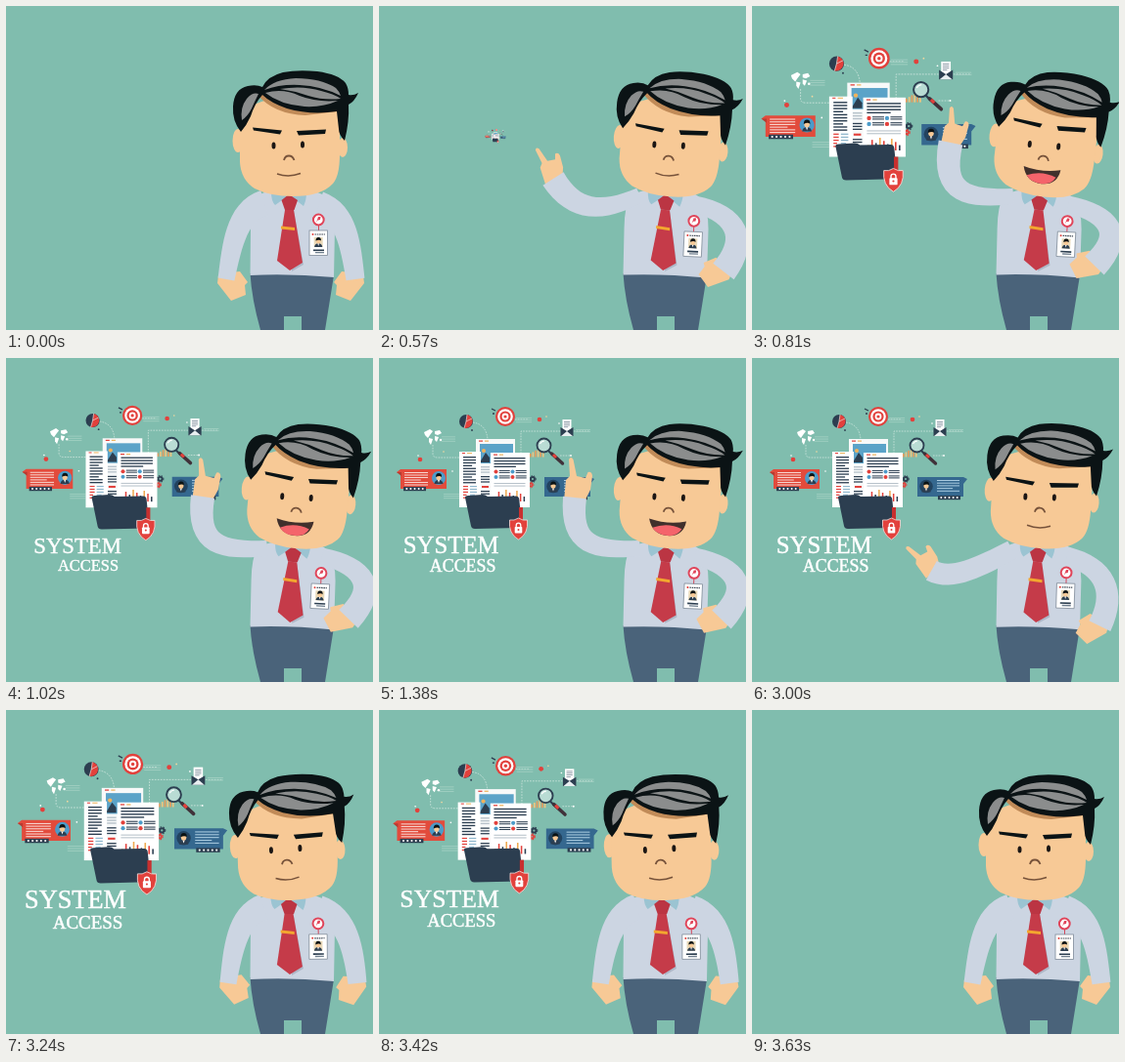
Recreate the animation shown at these times as an HTML page. Size 375x332 px, loop 4.5 s.

```html
<!DOCTYPE html>
<html lang="en">
<head>
<meta charset="utf-8">
<title>System access</title>
<style>
html, body { margin: 0; width: 100%; height: 100%; overflow: hidden; background: #80bdae; }
svg { display: block; width: 375px; height: 332px; }
text { font-family: "Liberation Serif", "Times New Roman", serif; fill: #fff; stroke: #fff; stroke-width: 0.45; }
</style>
</head>
<body>
<svg id="stage" viewBox="0 0 375 332"></svg>
<script>
const LOOP = 4500;
const NAVY = '#2c3e50', RED = '#e2413c', SKIN = '#f7c996', HAIR = '#0b1315', SHIRT = '#ccd5e2', GRAY = '#8b8d8d';

const path = (d, fill, extra = '') => `<path d="${d}" fill="${fill}" ${extra}/>`;
const line = (d, stroke, w = 1, extra = '') => path(d, 'none', `stroke="${stroke}" stroke-width="${w}" ${extra}`);
const rect = (x, y, w, h, fill, extra = '') => `<rect x="${x}" y="${y}" width="${w}" height="${h}" fill="${fill}" ${extra}/>`;
const dot = (x, y, r, fill, extra = '') => `<circle cx="${x}" cy="${y}" r="${r}" fill="${fill}" ${extra}/>`;
const oval = (x, y, rx, ry, fill) => `<ellipse cx="${x}" cy="${y}" rx="${rx}" ry="${ry}" fill="${fill}"/>`;
const group = (id, body) => `<g id="${id}">${body}</g>`;
const repeat = (n, fn) => Array.from({ length: n }, (_, i) => fn(i)).join('');
const rows = (x, y, w, n, gap, fill, h = 1) =>
  repeat(n, i => rect(x, y + i * gap, i % 4 === 3 ? w * 0.7 : w, h, fill));
const person = (x, y, s) => `<g transform="translate(${x} ${y}) scale(${s})">` +
  path('M-4.5 6Q-4 2 0 2Q4 2 4.5 6Z', NAVY) + path('M-1 2L1 2L0 5Z', '#fff') +
  oval(0, -1, 2.6, 3.3, SKIN) + path('M-3 -1Q-3 -5 0 -5Q3.4 -5 3 -1Q1 -3 -3 -1Z', HAIR) + '</g>';

function wires() {
  const dash = d => line(d, '#d9ece5', 0.7, 'stroke-dasharray="1.6 1.2"');
  return dash('M96 66Q110 68 111 84') + dash('M55 89V98Q55 102 60 102H82') +
    dash('M145 98V75H185') + dash('M199 75H216') + dash('M139 63H152') + dash('M185 100H196') +
    rows(64, 80.5, 14, 3, 2.2, '#a8d3c6', 0.7) + rows(66, 139, 16, 3, 2.2, '#a8d3c6', 0.7) +
    rows(140, 61, 16, 3, 2.2, '#a8d3c6', 0.7) + rows(201, 73, 15, 2, 2.2, '#a8d3c6', 0.7) +
    dot(42, 104, 2.3, RED) + dot(164, 63, 2.3, RED) + dot(40, 100, 0.8, '#fff') +
    dot(95, 74, 0.9, NAVY) + dot(171, 60, 0.8, '#f3d9a0') + dot(184, 67, 0.8, '#fff') +
    dot(66, 96, 0.8, '#f3d9a0') + dot(196, 100, 0.9, '#fff') + dot(75, 116, 0.8, '#fff');
}

function smallIcons() {
  const map = path('M46 76L52 73L55 75L52 79L50 82L47 79Z', '#fff') + path('M51 82L55 83L53 89L51 86Z', '#fff') +
    path('M57 75L62 74L64 77L60 79L57 78Z', '#fff') + path('M57 80L61 81L59 86L57 84Z', '#fff') + dot(63, 84, 1.2, '#fff');
  const pie = dot(89, 65, 7, NAVY) + path('M89 65L90 58A7 7 0 0 1 87 71.7Z', RED) +
    line('M90 58L89 65L87 72M89 65L95 62', '#e9d9d6', 0.7);
  const target = [10, 7.8, 5.6, 3.4, 1.6].map((r, i) => dot(129, 60, r, i % 2 ? '#fff' : RED)).join('') +
    line('M115 52L119 54M116 57L118 57', NAVY, 1.3);
  const mail = rect(187.5, 63, 9, 13, '#fff') + rows(189, 65, 6, 4, 1.8, '#7d8c9a', 0.8) +
    path('M185.5 71L192 75L198.5 71V80H185.5Z', NAVY) + path('M186 80L192 75L198 80Z', '#e8eef0');
  const bars = repeat(6, i => rect(154 + i * 2.6, 98 - i * 1.6, 1.6, 3.5 + i * 1.6, i % 2 ? '#efc67f' : '#e89b5b'));
  const lens = line('M173 95L178 100', NAVY, 2) + line('M176.5 98L187.5 108', '#40323a', 3.4, 'stroke-linecap="round"') +
    line('M178 99L181 102', RED, 3) + dot(168.5, 89.5, 7, '#b9dcd4', `stroke="${NAVY}" stroke-width="1.8"`) +
    line('M164.5 88Q166 85 169 85', '#fff', 1.1);
  const gear = (x, y, r, c) => dot(x, y, r, 'none', `stroke="${c}" stroke-width="1.8"`) +
    dot(x, y, r + 1.3, 'none', `stroke="${c}" stroke-width="1" stroke-dasharray="1.4 1.3"`);
  return map + pie + target + mail + bars + lens + gear(157, 124, 2, NAVY) + gear(155, 130, 1.6, RED);
}

function cards() {
  const stars = (x, y) => rect(x, y, 23, 4.2, NAVY) + repeat(5, i => dot(x + 3.3 + i * 4.1, y + 2.1, 1, '#fff'));
  return path('M18 117L22 119V134H69V114H22Z', '#e24b3c') + path('M18 117H23V121Z', '#b93a30') +
    rows(26, 117, 24, 6, 2.5, '#f8d5cf', 1) + dot(61, 123, 7, '#4c9bc9') + person(61, 123, 1) + stars(25, 132) +
    path('M169 122H216L220 124L216 129V142H169Z', '#35688f') + rows(189, 125, 23, 5, 2.7, '#a9cbe0', 1) +
    dot(178, 131.5, 6.8, '#22435f') + person(178, 131.5, 1) + stars(190, 141);
}

function papers() {
  const left = rect(82, 96, 22, 57, '#fff') + rect(85, 97, 3, 1, RED) + rect(90, 97, 5, 1, '#efb45e') +
    rows(86, 101, 13, 10, 2.9, NAVY, 1.3) + rows(86, 131, 5, 5, 2.9, RED, 1.2) + rows(93, 131, 7, 5, 2.9, '#8fb6cc', 1.2);
  const back = rect(99, 83, 40, 70, '#f7f9f9') + rect(102, 84.5, 4, 1.2, RED) + rect(108, 84.5, 4, 1.2, '#efb45e') +
    rect(103, 88, 34, 20, '#5ba3c8') + path('M103 107L109 97L113 102L113 107Z', NAVY) + dot(107, 95, 2, '#f0b35b') +
    rows(104, 111, 9, 3, 2.7, '#b6c1c9', 1.3) + rows(104, 121, 9, 3, 2.7, NAVY, 1.2) +
    rect(105, 131, 7, 2, RED) + rows(104, 136, 9, 2, 2.6, NAVY, 1.2);
  const front = rect(114, 97, 40, 56, '#fff') + rect(117, 98.5, 4, 1.2, RED) + rect(123, 98.5, 4, 1.2, '#efb45e') +
    rows(117.5, 102, 32, 4, 2.9, NAVY, 1.3) +
    repeat(4, i => {
      const x = 119.5 + (i % 2) * 17, y = 116.5 + (i >> 1) * 5.5;
      return dot(x, y, 2, i % 3 ? '#4c9bc9' : RED) + rows(x + 3.2, y - 1.6, 11, 2, 2, NAVY, 1);
    }) +
    rows(117.5, 128, 32, 2, 2.6, '#b6c1c9', 1) +
    repeat(9, i => {
      const h = 5 + (i * 5 % 8);
      return rect(118 + i * 3.7, 147 - h, 1.5, h, ['#efa94f', RED, NAVY][i % 3]);
    });
  const folder = path('M88 143Q88 141 91 141L106 140Q109 140 111 142L140 141.5Q143 141.5 143.3 145L146 172Q146 174 143 174L98 175Q94.5 175 94 172Z', NAVY);
  const shield = rect(143, 153, 4, 14, '#c9302f') +
    path('M142.5 164Q147 167 151.5 166Q153 180 142.5 186Q132 180 133.5 166Q138 167 142.5 164Z', RED, 'stroke="#f7dedb" stroke-width="0.8"') +
    rect(138.7, 173, 7.6, 6.5, '#fff', 'rx="0.8"') + line('M140.2 174V171.5A2.3 2.3 0 0 1 144.8 171.5V174', '#fff', 1.3) + dot(142.5, 176, 1, RED);
  return back + left + front + folder + shield;
}

function head() {
  const face = oval(237, 138, 5.5, 12, SKIN) + oval(344, 145, 5, 10, SKIN) +
    path('M239 108L239 160Q240 178 254 187Q270 195 293 195Q322 195 334 182Q341 174 341 152L341 98Q290 80 239 108Z', SKIN);
  const hair = path('M257 91Q274 111 306 112L339 108L330 98L262 84Z', '#c18b58') +
    path('M240 129Q231 118 232 103Q233 85 247 82Q256 80 262 83Q267 72 283 68Q298 65 318 67Q340 70 347 79Q350 84 350 91Q355 92 360 89Q356 98 350 101Q351 118 346 138Q340 132 340 126L338 108Q311 112 287 105Q270 99 262 91Q254 100 250 113Q246 122 240 129Z', HAIR) +
    path('M241 117Q239 104 246 95Q252 88 258 90Q254 98 251 105Q247 113 241 117Z', GRAY) +
    path('M264 86Q274 75 296 74Q322 74 337 84Q341 88 342 92Q322 82 300 81Q280 80 264 86Z', GRAY) +
    path('M265 89Q283 84 300 92Q318 99 339 97Q324 104 305 103Q280 101 265 89Z', GRAY) +
    path('M280 85Q303 81 322 87Q335 90 342 95Q325 97 309 92Q295 87 280 85Z', GRAY);
  const brows = group('brows', path('M252 124.5L282 127.5L280 131.5L253 127.5Z', HAIR) + path('M297 128L327 126.5L326 131L299 132.5Z', HAIR));
  const open = group('open', path('M270 166Q289 171 308 166Q306 182 290 182Q274 182 270 166Z', '#41302c') +
    path('M274 175Q289 168 304 174Q300 182 290 182Q279 182 274 175Z', '#f4646b'));
  return face + hair + brows + oval(273.5, 143, 2, 3.5, '#1b1614') + oval(303, 142, 2, 3.5, '#1b1614') +
    line('M284 158Q285 153.5 289 153.5Q293 153.5 294.5 158', '#76523a', 1.8) +
    group('shut', line('M277 172Q289 176 301 171.5', '#76523a', 1.5)) + open;
}

function badge() {
  return line('M319.5 224V231', '#d3475a', 1) + dot(319.3, 219, 5.4, '#fff', 'stroke="#e0455a" stroke-width="2"') +
    path('M317 222L319 216H321.5L321 219L318.5 219.5Z', '#e0455a') +
    rect(310, 230, 18.5, 25.5, '#fff', 'stroke="#7f8b99" stroke-width="0.8"') +
    dot(313.5, 234, 1, RED) + line('M315.5 234H326', '#424b57', 1.2, 'stroke-dasharray="1.6 0.7"') +
    rect(314.7, 237, 9, 10, '#e9d9b9') + person(319.2, 241.5, 0.9) + rect(314, 249.5, 11, 1.6, NAVY) + rect(316, 252, 9, 1.3, '#71808f');
}

const torso = path('M249.5 276L250 228Q250 206 256 195Q264 190 273 189H307Q320 190 326 195Q336 207 336 228L335 278Q290 274 249.5 276Z', SHIRT);
const tie = path('M273 190L289 194L275 204Q271 200 271 191Z', '#9bc4d2') + path('M307 190L290 194L304 205Q307 199 307 191Z', '#9bc4d2') +
  path('M294 209L304 265L292 272Z', '#aeb9c9') + path('M285 209H294L303 263L290 271L277 261Z', '#c53b49') +
  path('M289 193L298 199L294.5 209H285L281.5 199Z', '#bb3543') + path('M281 225.5L295 227V230L281 228.5Z', '#f3a72f');
const hand = path('M-9 4L-8 -4L4 -7L14 -8L22 3L19 6L20 16L5 22Z', SKIN);
const point = path('M-11 3L-9 -18L-5 -22L-6 -39Q-4 -43 -1.5 -39L2 -22L11 -20L13.5 -26Q17.5 -27 18 -22L16 -8L10 4Z', SKIN);

const stage = document.getElementById('stage');
stage.innerHTML = rect(0, 0, 375, 332, '#80bdae') +
  group('cluster', wires() + smallIcons() + cards() + papers() +
    group('title', '<text x="24.8" y="199.5" font-size="24.8">SYSTEM</text><text x="51.8" y="218.5" font-size="17.9">ACCESS</text>')) +
  path('M249.5 274Q290 271 335 276L326 332H302V318H284V332H260Q251 300 249.5 274Z', '#4a637a') +
  group('torso', torso) +
  group('handL', group('rest', hand) + group('point', point)) + path('', SHIRT, 'id="armL"') +
  group('handR', hand) + path('', SHIRT, 'id="armR"') +
  group('front', tie + badge() + group('head', head()));

const el = {};
stage.querySelectorAll('[id]').forEach(e => { el[e.id] = e; });
const set = (id, name, value) => el[id].setAttribute(name, value);
const show = (id, on) => set(id, 'visibility', on ? 'visible' : 'hidden');

// Body tilt, head tilt, brow lift | left arm: shoulder y, c1, c2, wrist, hand turn, hand size, widths | right arm: c1, c2, wrist, hand turn, widths
const idle = [0, 0, 0, 202, 236, 210, 231, 245, 225, 280, 0, 1, 27, 17, 348, 212, 352, 245, 357, 280, 0, 26, 19];
const swing = [1.5, 1.5, 0, 198, 236, 214, 206, 238, 186, 238, -50, 0.85, 22, 21, 358, 214, 370, 240, 357, 276, 18, 20, 23];
const reach = [2.6, 2, 1.5, 194, 228, 212, 200, 212, 178, 177, -23, 0.87, 16, 25, 368, 214, 377, 240, 352, 272, 32, 17, 27];
const talk = [3, 3.6, 6.5, 195, 222, 198, 192, 194, 203, 140, 7, 0.9, 16, 25, 368, 214, 380, 235, 350, 266, 42, 17, 27];
const hold = [2.7, 1.8, 4.5, 195, 220, 198, 195, 192, 200, 143, 0, 1, 16, 24, 368, 214, 380, 237, 350, 268, 40, 17, 27];
const lower = [2.6, 1.9, 4.5, 195, 216, 206, 185, 198, 195.5, 149, -9, 0.82, 16, 24, 368, 214, 379, 238, 351, 270, 38, 17, 27];
const past = [-0.4, -1.8, 0, 202, 237, 210, 232, 245, 227, 280, -3, 1, 27, 17, 349, 212, 355, 245, 359, 280, -3, 26, 19];
const keys = [[0, idle], [330, idle], [450, swing], [570, reach], [810, talk], [870, talk], [1100, hold],
  [2759, hold], [2760, lower], [2900, reach], [3050, swing], [3210, past], [3300, past], [3630, idle], [LOOP, idle]];

function poseAt(t) {
  const i = Math.max(1, keys.findIndex(k => k[0] > t));
  const [t0, a] = keys[i - 1], [t1, b] = keys[i];
  const k = (t - t0) / (t1 - t0);
  return a.map((v, j) => v + (b[j] - v) * k);
}

// Outline of a cubic curve whose width runs from w0 to w1.
function sleeve(x0, y0, x1, y1, x2, y2, x3, y3, w0, w1) {
  const sides = [[], []];
  for (let i = 0; i <= 16; i++) {
    const k = i / 16, m = 1 - k, r = (w0 + (w1 - w0) * k) / 2;
    const at = (a, b, c, d) => a * m ** 3 + 3 * b * m * m * k + 3 * c * m * k * k + d * k ** 3;
    const slope = (a, b, c, d) => (b - a) * m * m + 2 * (c - b) * m * k + (d - c) * k * k;
    const x = at(x0, x1, x2, x3), y = at(y0, y1, y2, y3);
    const dx = slope(x0, x1, x2, x3), dy = slope(y0, y1, y2, y3), n = r / Math.hypot(dx, dy);
    sides[0].push(`${x - dy * n} ${y + dx * n}`);
    sides[1].unshift(`${x + dy * n} ${y - dx * n}`);
  }
  return `M${sides.flat().join('L')}Z`;
}

const clamp = x => Math.min(1, Math.max(0, x));
const inBack = x => 2.7 * x ** 3 - 1.7 * x ** 2;
const outBack = x => 1 - inBack(1 - x);
const pop = (t, start, length = 513) => outBack(clamp((t - start) / length));
const zoom = (id, s, x, y) => {
  set(id, 'transform', `translate(${x} ${y}) scale(${Math.max(0, s)}) translate(${-x} ${-y})`);
  show(id, s > 0.002);
};

function draw(t) {
  const [body, tilt, brow, sy, a, b, c, d, lx, ly, turnL, size, l0, l1, e, f, g, h, rx, ry, turnR, r0, r1] = poseAt(t);
  const leave = 1 - inBack(clamp((t - 3117) / 513));
  zoom('cluster', t < 3117 ? pop(t, 558) : leave, 119, 135);
  zoom('title', pop(t, 867), 74, 200);
  if (t < 867 || t >= 3630) show('title', false);
  else el.title.removeAttribute('visibility');

  set('torso', 'transform', `rotate(${body * 0.25} 291 276)`);
  set('front', 'transform', `rotate(${body} 291 275)`);
  set('head', 'transform', `rotate(${tilt} 290 195)`);
  set('brows', 'transform', `translate(${brow * 0.3} ${-brow})`);
  const talking = t >= 660 && t < 2940;
  show('open', talking);
  show('shut', !talking);

  set('armL', 'd', sleeve(264 + body, sy, a, b, c, d, lx, ly, l0, l1));
  set('armR', 'd', sleeve(320 + body, 203, e, f, g, h, rx, ry, r0, r1));
  set('handL', 'transform', `translate(${lx} ${ly}) rotate(${turnL}) scale(${size})`);
  set('handR', 'transform', `translate(${rx} ${ry}) rotate(${turnR}) scale(-1 1)`);
  const pointing = t >= 450 && t < 3050;
  show('point', pointing);
  show('rest', !pointing);
}

let start;
function tick(now) {
  start ??= now;
  draw((now - start) % LOOP);
  requestAnimationFrame(tick);
}
draw(0);
requestAnimationFrame(tick);
</script>
</body>
</html>
```
